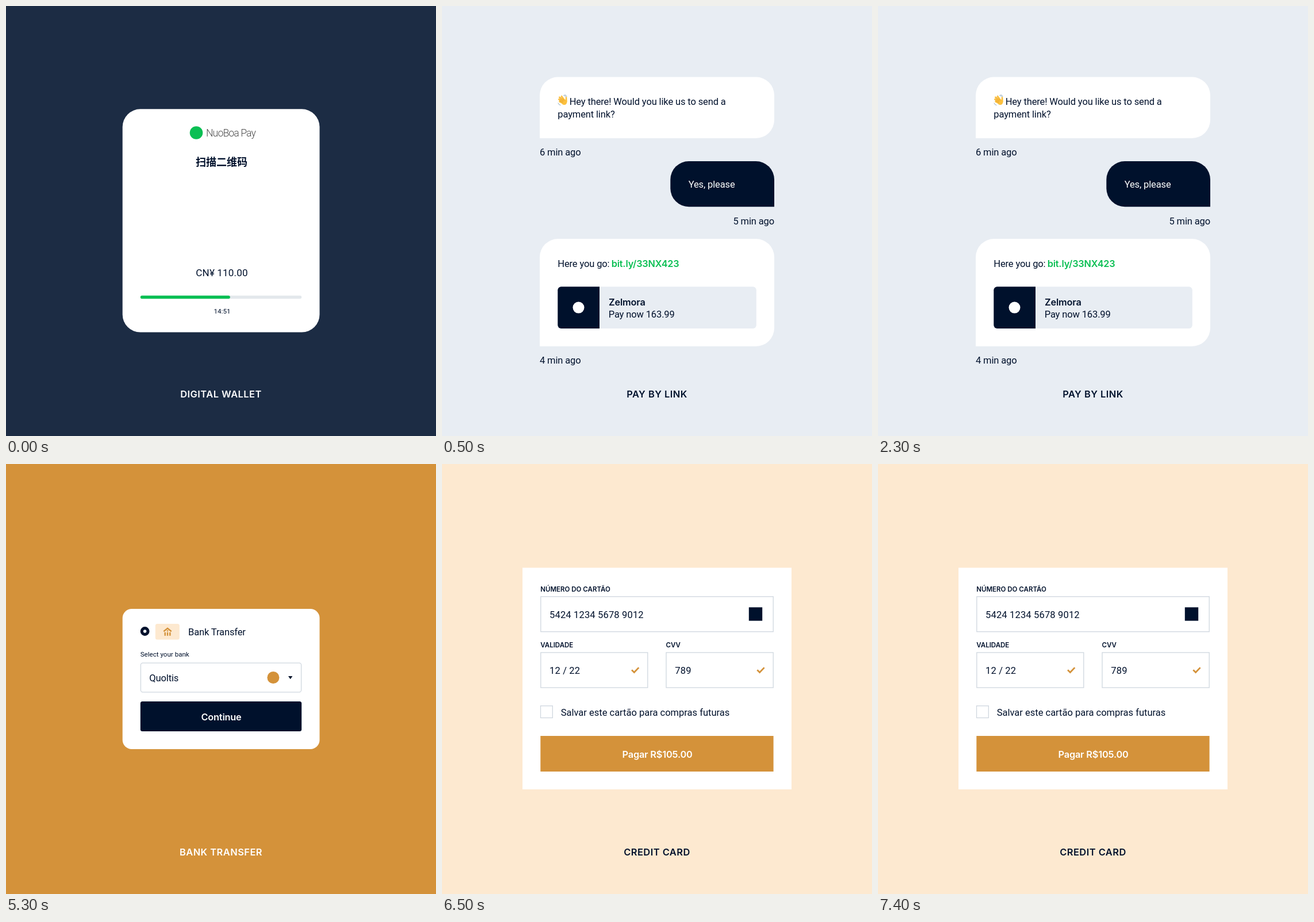
Recreate the animation shown at these times as an HTML page. Size 748x748 px, loop 8 s.

```html
<!DOCTYPE html>
<html lang="en">
<head>
<meta charset="utf-8">
<title>Ways to pay</title>
<style>
  html, body { margin: 0; width: 100%; height: 100%; overflow: hidden; }
  svg { display: block; width: 100vw; height: 100vh; }
  .scene { visibility: hidden; }
  text { font: 400 16.5px Roboto, sans-serif; letter-spacing: -.008em; fill: #00112c; }
  .bold { font: 600 16.3px Inter, sans-serif; letter-spacing: -.01em; }
  .title { font: 600 16.4px Inter, sans-serif; letter-spacing: .5px; text-anchor: middle; }
  .label { font: 600 11.5px Inter, sans-serif; letter-spacing: 0; }
  .small { font-size: 11.6px; letter-spacing: 0; }
  .cjk { font: 700 18px "Noto Sans CJK SC", "Noto Sans CJK", sans-serif; letter-spacing: 0; }
  .brand { font-size: 17.6px; font-weight: 300; letter-spacing: -.05em; fill: #4d4d4d; }
  .mid { text-anchor: middle; }
  .end { text-anchor: end; }
  .white { fill: #fff; }
  .navy { fill: #00112c; }
  .amber { fill: #d4923a; }
  .green { fill: #0abf53; }
  .mist { fill: #e8edf3; }
  .cream { fill: #fde9d0; }
  .track { fill: #e3e8ec; }
  .field { fill: #fff; stroke: #cfd7df; stroke-width: 1.3; }
  .line { fill: none; stroke: #d4923a; stroke-width: 2.4; }
  .wide { letter-spacing: .01em; }
</style>
</head>
<body>
<svg viewBox="0 0 748 748">
  <defs>
    <path id="tick" class="line" d="M0 4.8 4.3 9 12.3 .6" style="stroke-width:2.8"/>
  </defs>

  <g class="scene">
    <rect width="748" height="748" fill="#1c2c44"/>
    <rect class="white" x="202.7" y="179.3" width="342.8" height="388.3" rx="31"/>
    <circle class="green" cx="331" cy="220.5" r="11.3"/>
    <text class="brand" x="348" y="227">NuoBoa Pay</text>
    <text class="cjk mid" x="375" y="278" lang="zh-CN">扫描二维码</text>
    <text class="mid wide" x="375.5" y="470" style="font-size:17px">CN¥ 110.00</text>
    <rect class="track" x="233.8" y="503.8" width="280.4" height="5.4" rx="2.7"/>
    <rect class="green" x="233.8" y="503.8" width="156" height="5.4" rx="2.7"/>
    <text class="small mid" x="376" y="535.3">14:51</text>
    <text class="title white" x="374" y="681">DIGITAL WALLET</text>
  </g>

  <g class="scene">
    <rect class="mist" width="748" height="748"/>
    <path class="white" d="M170 230V155.5a32 32 0 0 1 32-32H546a32 32 0 0 1 32 32V198a32 32 0 0 1-32 32z"/>
    <g fill="none" stroke="#fcc13f" stroke-width="2.7" stroke-linecap="round">
      <path d="M204.6 166.2l6 3M203.3 162.3l8 5M204.3 158.8l8 7M208 157l6 8M216 159.400l.4 7"/>
      <ellipse cx="212.6" cy="167.3" rx="3.4" ry="3.4" fill="#fcc13f"/>
      <path stroke="#d98b21" stroke-width=".7" d="M204.500 164.600l5.500 3.200M204.300 160.900l6.500 4.800M206.500 158.400l6 6"/>
      <path stroke="#7f9fb5" stroke-width=".9" d="M202 169q1 3 4 3.600M211.800 155.500q2.600.3 3.600 2.200M213.600 154.400q2.600.8 3.400 3"/>
    </g>
    <text x="221.7" y="171.7">Hey there! Would you like us to send a</text>
    <text x="201.3" y="193.7">payment link?</text>
    <text x="170" y="260">6 min ago</text>
    <path class="navy" d="M578 349.2H429.300a32 32 0 0 1-32-32V302a32 32 0 0 1 32-32H546a32 32 0 0 1 32 32z"/>
    <text class="white" x="428.7" y="316">Yes, please</text>
    <text class="end" x="578" y="379.5">5 min ago</text>
    <path class="white" d="M170 592V437a32 32 0 0 1 32-32H546a32 32 0 0 1 32 32V560a32 32 0 0 1-32 32z"/>
    <text x="201.3" y="453.5">Here you go:</text>
    <text class="bold green" x="294.7" y="453.5">bit.ly/33NX423</text>
    <rect class="mist" x="201.3" y="488.2" width="345.5" height="72.8" rx="6"/>
    <path class="navy" d="M274 488.2V561H207.3a6 6 0 0 1-6-6V494.2a6 6 0 0 1 6-6z"/>
    <circle class="white" cx="237.5" cy="524.6" r="10"/>
    <text class="bold" x="290" y="521">Zelmora</text>
    <text x="289.7" y="542">Pay now 163.99</text>
    <text x="170" y="622.3">4 min ago</text>
    <text class="title" x="374" y="681">PAY BY LINK</text>
  </g>

  <g class="scene">
    <rect class="amber" width="748" height="748"/>
    <rect class="white" x="202.7" y="252" width="342.8" height="244" rx="16"/>
    <circle class="navy" cx="241.6" cy="291" r="7.9"/>
    <circle class="white" cx="241.6" cy="291" r="2.7"/>
    <rect class="cream" x="259.8" y="278" width="42" height="27.4" rx="3.5"/>
    <path class="line" d="M274.3 291.2 281 285.7 287.7 291.2M276.7 292.8v5.9M281 292.8v5.9M285.3 292.8v5.9"/>
    <circle class="amber" cx="281" cy="290.3" r="1.2"/>
    <text x="317" y="297.5">Bank Transfer</text>
    <text class="small" x="233.7" y="335.2">Select your bank</text>
    <rect class="field" x="234.4" y="346.2" width="279.2" height="50.6" rx="3.5"/>
    <text x="249.3" y="377.8">Quoltis</text>
    <circle class="amber" cx="464.9" cy="371.5" r="10.5"/>
    <path class="navy" d="M491 369h7.4l-3.7 5.3z"/>
    <rect class="navy" x="233.8" y="413" width="280.4" height="52" rx="3.5"/>
    <text class="bold white mid" x="374.5" y="445.6">Continue</text>
    <text class="title white" x="374" y="681">BANK TRANSFER</text>
  </g>

  <g class="scene">
    <rect class="cream" width="748" height="748"/>
    <rect class="white" x="140" y="180.5" width="468" height="385.5"/>
    <text class="label" x="171.3" y="222">NÚMERO DO CARTÃO</text>
    <rect class="field" x="171.8" y="230.7" width="404.4" height="61"/>
    <text class="wide" x="187" y="267.6">5424 1234 5678 9012</text>
    <rect class="navy" x="533.8" y="249.3" width="23.4" height="23.4"/>
    <text class="label" x="171.3" y="319.3">VALIDADE</text>
    <rect class="field" x="171.8" y="328" width="186" height="61"/>
    <text class="wide" x="187" y="365">12 / 22</text>
    <use href="#tick" x="330" y="353.5"/>
    <text class="label" x="389.6" y="319.3">CVV</text>
    <rect class="field" x="390" y="328" width="186.2" height="61"/>
    <text class="wide" x="405.3" y="365">789</text>
    <use href="#tick" x="548.3" y="353.5"/>
    <rect class="field" x="171.5" y="420.7" width="20.8" height="20.8"/>
    <text x="206.7" y="438" style="letter-spacing:0">Salvar este cartão para compras futuras</text>
    <rect class="amber" x="171.3" y="473" width="405.3" height="62"/>
    <text class="bold white mid" x="374.6" y="510.6">Pagar R$105.00</text>
    <text class="title" x="374" y="681">CREDIT CARD</text>
  </g>
</svg>
<script>
  const LOOP = 8000;
  const starts = [0, 500, 3500, 6500];
  const scenes = document.querySelectorAll('.scene');

  function show(time) {
    const t = time % LOOP;
    const current = starts.findLastIndex(s => t >= s);
    scenes.forEach((el, i) => {
      el.style.visibility = i === current ? 'visible' : 'hidden';
    });
  }

  let begin = null;
  function tick(now) {
    begin ??= now;
    show(now - begin);
    requestAnimationFrame(tick);
  }
  show(0);
  requestAnimationFrame(tick);
</script>
</body>
</html>
```
